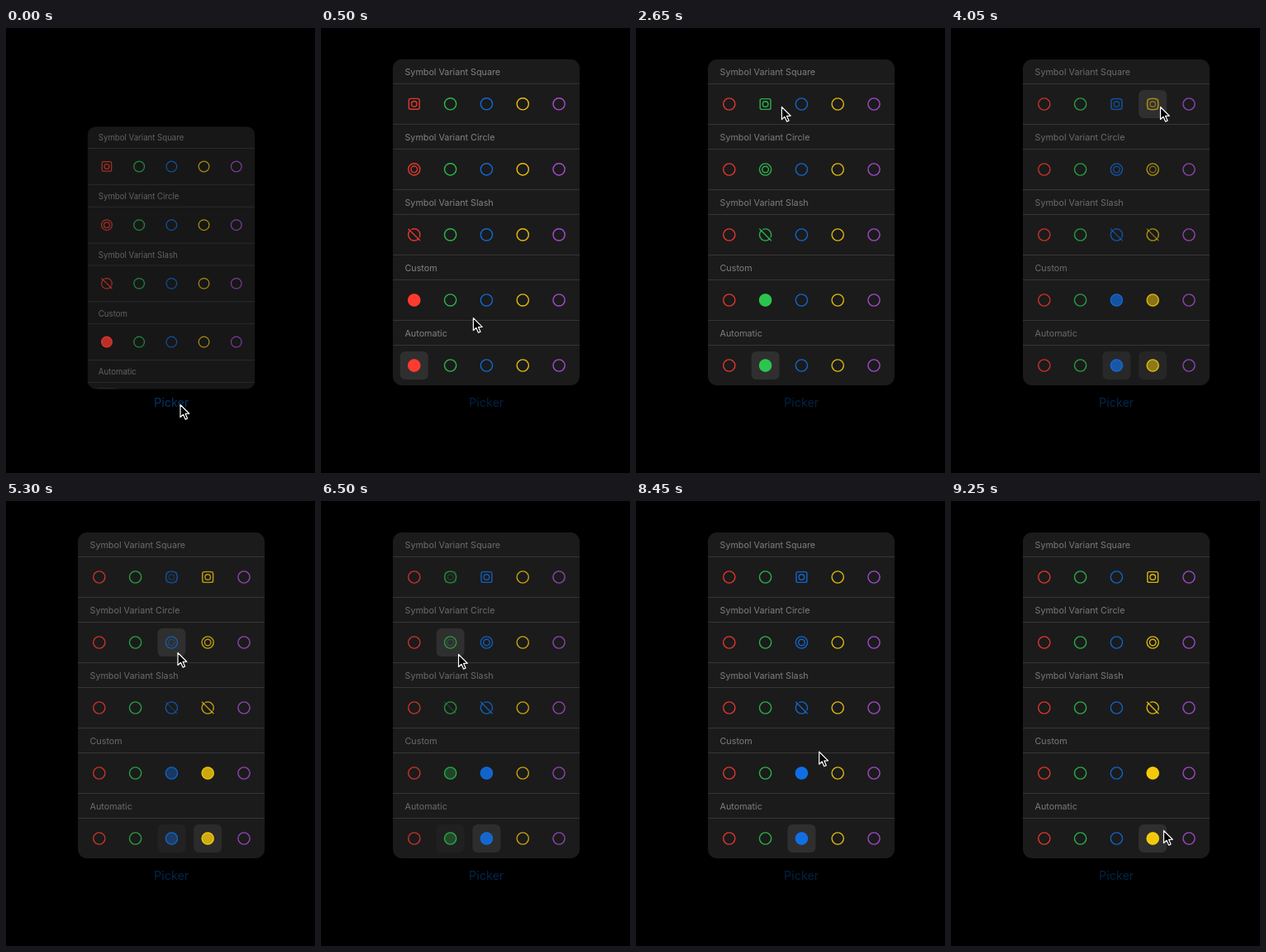
Animation of 374 by 538 pixels, one loop 9.3 s. Source, as an HTML page with a canvas:

```html
<!DOCTYPE html>
<html lang="en">
<head>
<meta charset="utf-8">
<title>Picker menu</title>
<style>
html, body { margin: 0; width: 100%; height: 100%; overflow: hidden; background: #000; }
canvas { display: block; width: 374px; height: 538px; }
</style>
</head>
<body>
<canvas id="stage"></canvas>
<script>
const W = 374, H = 538, LOOP = 9300, STEP = 50;
const canvas = document.getElementById('stage');
const ctx = canvas.getContext('2d');
const dpr = window.devicePixelRatio || 1;
canvas.width = W * dpr;
canvas.height = H * dpr;

const PANEL = { x: 87, top: 38, w: 226, h: 394, r: 11, fill: '#1b1b1b' };
const ROW = 79, COL = 43.8, HEAD = 30, FADE = 260;
const FONT = 'Inter, Roboto, sans-serif';
const sections = [
  { title: 'Symbol Variant Square', kind: 'square' },
  { title: 'Symbol Variant Circle', kind: 'circle' },
  { title: 'Symbol Variant Slash', kind: 'slash' },
  { title: 'Custom', kind: 'fill' },
  { title: 'Automatic', kind: 'fill', boxed: true }
];
const hues = ['#ff3b30', '#2cc850', '#1170e8', '#fbcf0c', '#b352e4'];

const clamp = v => Math.max(0, Math.min(1, v));
const ramp = (t, a, b) => clamp((t - a) / (b - a));
const mix = (a, b, p) => a + (b - a) * p;
const smooth = p => p * p * (3 - 2 * p);
const cellX = col => 112.8 + col * COL;
const cellY = row => row * ROW + 54;

// A tap falls on the cell nearest to the cursor tip.
const tap = (at, x, y) => ({
  at, x, y,
  col: Math.round((x - 8 - cellX(0)) / COL),
  row: Math.round((y - PANEL.top - cellY(0)) / ROW)
});
const taps = [
  tap(1050, 118.5, 91), tap(1830, 163, 95), tap(2770, 207, 95), tap(3910, 253.5, 95),
  tap(5200, 208, 183), tap(6430, 166.5, 185), tap(7600, 204.5, 257), tap(8700, 257.5, 398)
];

// The cursor glides to each tap, taking longer over longer ways.
function cursorAt(t) {
  let x = 211, y = 455;
  for (const next of taps) {
    const time = 70 + 2 * Math.hypot(next.x - x, next.y - y);
    const p = smooth(ramp(t, next.at - 20 - time, next.at - 20));
    x = mix(x, next.x, p);
    y = mix(y, next.y, p);
    if (p < 1) break;
  }
  return [x, y];
}

function selection(t) {
  const on = [1, 0, 0, 0, 0];
  for (const { at, col } of taps) {
    const p = ramp(t, at, at + FADE);
    for (let c = 0; c < 5; c++) on[c] = c === col ? mix(on[c], 1, p) : on[c] * (1 - p * p);
  }
  return on;
}

const pressAmount = (t, at) => ramp(t, at - 60, at) * (1 - ramp(t, at + 160, at + 360));

// Content dims on a press and slowly recovers.
const dimming = t => Math.max(...taps.map(({ at }) =>
  ramp(t, at - 60, at + 40) * Math.exp(-Math.max(0, t - at - 150) / 400)));

function roundRect(x, y, w, h, r) {
  ctx.beginPath();
  ctx.roundRect(x, y, w, h, r);
}

function disc(x, y, r) {
  ctx.beginPath();
  ctx.arc(x, y, r, 0, Math.PI * 2);
}

function ring(x, y, r) {
  disc(x, y, r);
  ctx.stroke();
}

function line(x0, y0, x1, y1) {
  ctx.beginPath();
  ctx.moveTo(x0, y0);
  ctx.lineTo(x1, y1);
  ctx.stroke();
}

function highlight(x, y, alpha) {
  ctx.globalAlpha = alpha * 0.085;
  ctx.fillStyle = '#fff';
  roundRect(x - 17, y - 17, 34, 34, 6);
  ctx.fill();
}

const symbols = {
  square(x, y) {
    roundRect(x - 6.4, y - 6.4, 12.8, 12.8, 2);
    ctx.stroke();
    ring(x, y, 3.3);
  },
  circle(x, y) {
    ring(x, y, 7.1);
    ring(x, y, 3.8);
  },
  slash(x, y, hue) {
    ring(x, y, 7.1);
    ctx.strokeStyle = PANEL.fill;
    line(x - 5.5, y - 7.7, x + 7.7, y + 5.5);
    ctx.strokeStyle = hue;
    line(x - 7.2, y - 7.2, x + 7.2, y + 7.2);
  },
  fill(x, y, hue) {
    ctx.fillStyle = hue;
    disc(x, y, 7.5);
    ctx.fill();
  }
};

function drawSection({ title, kind, boxed }, row, t, alpha) {
  const top = row * ROW, y = cellY(row);
  const dim = dimming(t), on = selection(t);

  ctx.globalAlpha = alpha;
  ctx.fillStyle = '#353535';
  ctx.fillRect(PANEL.x, top + HEAD - 1, PANEL.w, 1);
  ctx.fillRect(PANEL.x, top + ROW - 1, PANEL.w, 1);

  ctx.globalAlpha = alpha * (1 - 0.22 * dim);
  ctx.fillStyle = '#838383';
  ctx.font = '10.75px ' + FONT;
  ctx.fillText(title, 101.5, top + 19.4);

  hues.forEach((hue, col) => {
    const x = cellX(col);
    const presses = taps.filter(p => p.row === row && p.col === col).map(p => pressAmount(t, p.at));
    highlight(x, y, alpha * Math.max(boxed ? on[col] : 0, ...presses));

    ctx.strokeStyle = hue;
    ctx.lineWidth = 1.4;
    const solid = kind === 'fill';
    ctx.globalAlpha = alpha * (0.9 - 0.14 * dim) * (solid ? 1 : 1 - on[col]);
    ring(x, y, 7.1);
    ctx.globalAlpha = alpha * (solid ? 1 : 0.88) * (1 - 0.08 * dim) * on[col];
    symbols[kind](x, y, hue);
  });
}

function drawPanel(t) {
  const swing = Math.exp(-t / 102) * Math.cos(t * 0.0175);
  const scale = 1 - 0.105 * swing;
  const k = Math.max(0, swing);
  const height = PANEL.h * (1 - 0.1 * k);
  const shown = ramp(t, 0, 220);

  ctx.save();
  ctx.translate(200, PANEL.top + PANEL.h + 4.5 * k - height * scale);
  ctx.scale(scale, scale);
  ctx.translate(-200, 0);
  roundRect(PANEL.x, 0, PANEL.w, height, PANEL.r);
  ctx.globalAlpha = mix(0.88, 1, shown);
  ctx.fillStyle = PANEL.fill;
  ctx.fill();
  ctx.clip();
  sections.forEach((section, row) => drawSection(section, row, t, mix(0.7, 1, shown)));
  ctx.restore();
}

function drawLabel(t) {
  ctx.globalAlpha = mix(0.4, 0.25, ramp(t, 0, 220)) + 0.04 * dimming(t);
  ctx.fillStyle = '#0a84ff';
  ctx.font = '14.4px ' + FONT;
  ctx.fillText('Picker', 179, 457.6);
}

function drawCursor(t) {
  const [x, y] = cursorAt(t);
  const arrow = [[0, 0], [0, 15], [3.5, 11.8], [6.1, 17.6], [8.6, 16.5], [6.1, 10.9], [10.8, 10.7]];
  ctx.globalAlpha = 1;
  ctx.beginPath();
  arrow.forEach(([dx, dy]) => ctx.lineTo(x + dx, y + 0.5 + dy));
  ctx.closePath();
  ctx.fillStyle = '#000';
  ctx.fill();
  ctx.strokeStyle = '#fff';
  ctx.lineWidth = 1.2;
  ctx.lineJoin = 'round';
  ctx.stroke();
}

function draw(t) {
  ctx.setTransform(dpr, 0, 0, dpr, 0, 0);
  ctx.globalAlpha = 1;
  ctx.fillStyle = '#000';
  ctx.fillRect(0, 0, W, H);
  drawLabel(t);
  drawPanel(t);
  drawCursor(t);
}

const start = performance.now();
function tick() {
  const elapsed = (performance.now() - start) % LOOP;
  draw(Math.floor(elapsed / STEP) * STEP);
  requestAnimationFrame(tick);
}
tick();
</script>
</body>
</html>
```
